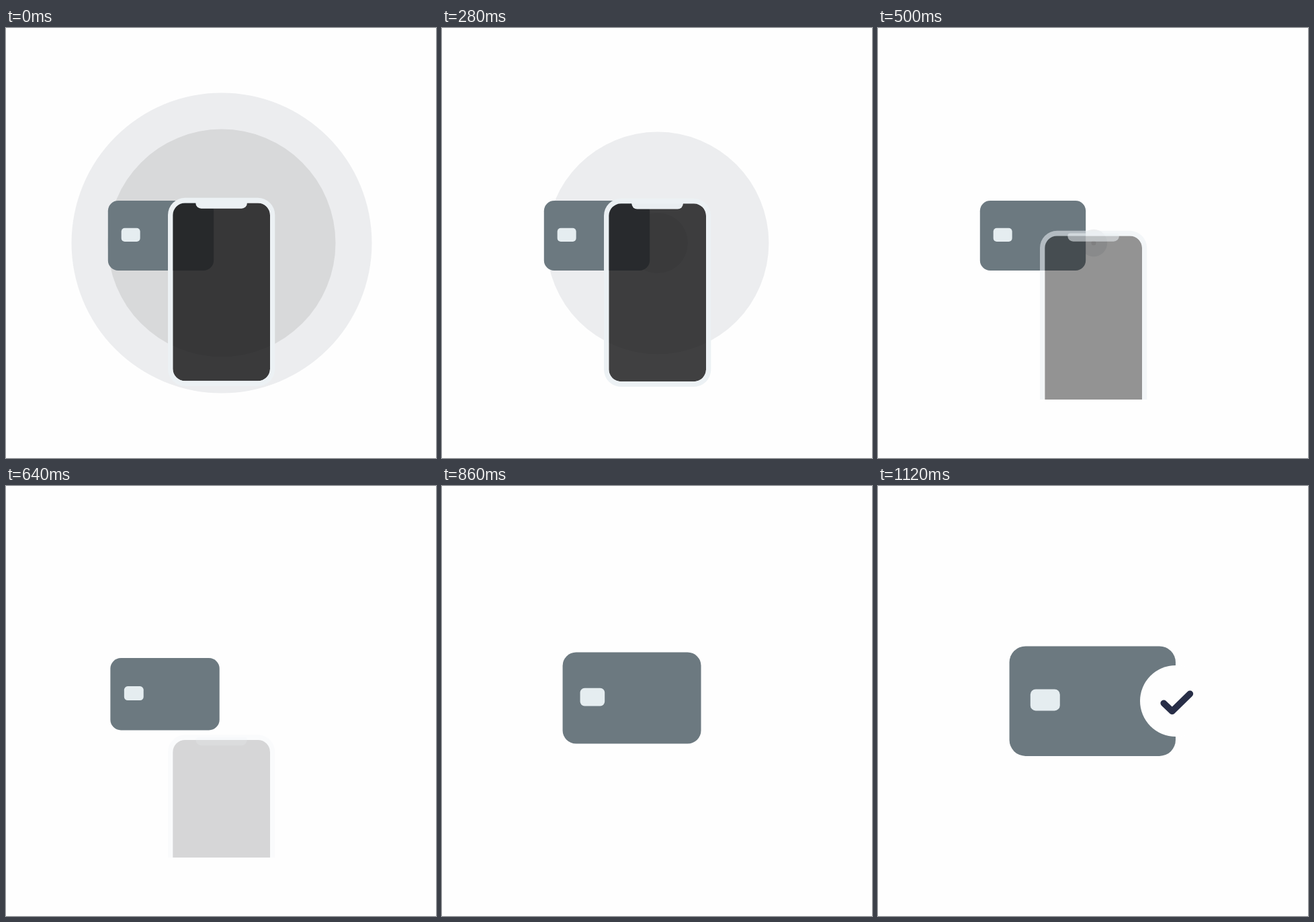
Animation, 640 px wide and 640 px high, one loop 1.96 s. Source, as an HTML page with a canvas:

```html
<!DOCTYPE html>
<html lang="en">
<head>
<meta charset="utf-8">
<title>Card payment</title>
<style>
  html, body { margin: 0; width: 100%; height: 100%; overflow: hidden; background: #fefefe; }
  canvas { display: block; width: 640px; height: 640px; }
</style>
</head>
<body>
<canvas id="stage" width="640" height="640"></canvas>
<script>
const ctx = document.getElementById('stage').getContext('2d');
const LOOP = 1960, STEP = 20, LAST_MOVE = 1120;
const BACKGROUND = '#fefefe';
const TRIM = '#ecf1f4';

const span = (t, from, to) => Math.min(1, Math.max(0, (t - from) / (to - from)));
const smooth = u => u * u * (3 - 2 * u);
const mix = (a, b, k) => a + (b - a) * k;

// Easing curve with control points (x1, 0) and (x2, 1)
function ease(x, x1, x2) {
  let lo = 0, hi = 1;
  for (let i = 0; i < 24; i++) {
    const u = (lo + hi) / 2, v = 1 - u;
    if (3 * v * v * u * x1 + 3 * v * u * u * x2 + u * u * u < x) lo = u;
    else hi = u;
  }
  return smooth(lo);
}

function disc(x, y, r, color) {
  ctx.fillStyle = color;
  ctx.beginPath();
  ctx.arc(x, y, Math.max(0, r), 0, Math.PI * 2);
  ctx.fill();
}

function box(x, y, w, h, r, color) {
  ctx.fillStyle = color;
  ctx.beginPath();
  ctx.roundRect(x, y, w, h, r);
  ctx.fill();
}

function drawRipples(t) {
  disc(321, 320, 223.5 * (1 - ease(span(t, 0, 643), 0.648, 0.495)), '#ecedef');
  disc(321, 320, 169.5 * (1 - ease(span(t, 0, 615), 0.333, 0.2)), '#d8d9da');
}

function drawCard(t) {
  const move = smooth(span(t, 552, 1104));
  const scale = mix(0.636, 1, smooth(span(t, 558, 1132)));
  ctx.save();
  ctx.translate(mix(230.5, 319.25, move), mix(309, 320.2, move));
  ctx.scale(scale, scale);
  box(-123.75, -81.75, 247.5, 163.5, 24, '#6c7980');
  box(-92.5, -17.75, 44, 32, 8, '#e5edf0');
  ctx.restore();
}

function drawPhone(t) {
  const opacity = 1 - smooth(span(t, 240, 803));
  if (opacity <= 0) return;
  const drop = 49 * (Math.max(0, t - 245) / 255) ** 2;
  ctx.save();
  ctx.beginPath();
  ctx.rect(0, 0, 640, 553);
  ctx.clip();
  ctx.translate(0, drop);

  ctx.globalAlpha = opacity * 0.85;
  box(248.3, 260.4, 144.7, 264.9, 18, '#1c1c1d');

  ctx.globalAlpha = opacity;
  ctx.fillStyle = TRIM;
  ctx.beginPath();
  ctx.roundRect(241, 252.8, 159.3, 280.2, 25.5);
  ctx.roundRect(248.3, 260.4, 144.7, 264.9, 18);
  ctx.fill('evenodd');

  box(282.3, 256.5, 76.6, 12.2, [4, 4, 8.5, 8.5], TRIM);
  ctx.restore();
}

function drawCheck(t) {
  const scale = smooth(span(t, 860, LAST_MOVE));
  if (scale <= 0) return;
  ctx.save();
  ctx.translate(443, 320);
  ctx.scale(scale, scale);
  disc(0, 0, 53, BACKGROUND);
  ctx.strokeStyle = '#282e47';
  ctx.lineWidth = 9.6;
  ctx.lineCap = ctx.lineJoin = 'round';
  ctx.beginPath();
  ctx.moveTo(-17.8, 3.2);
  ctx.lineTo(-5.2, 15.3);
  ctx.lineTo(21.4, -10.7);
  ctx.stroke();
  ctx.restore();
}

function draw(t) {
  ctx.fillStyle = BACKGROUND;
  ctx.fillRect(0, 0, 640, 640);
  drawRipples(t);
  drawCard(t);
  drawPhone(t);
  drawCheck(t);
}

const start = performance.now();
function tick() {
  const t = (performance.now() - start) % LOOP;
  draw(Math.min(LAST_MOVE, Math.floor(t / STEP) * STEP));
  requestAnimationFrame(tick);
}
draw(0);
requestAnimationFrame(tick);
</script>
</body>
</html>
```
